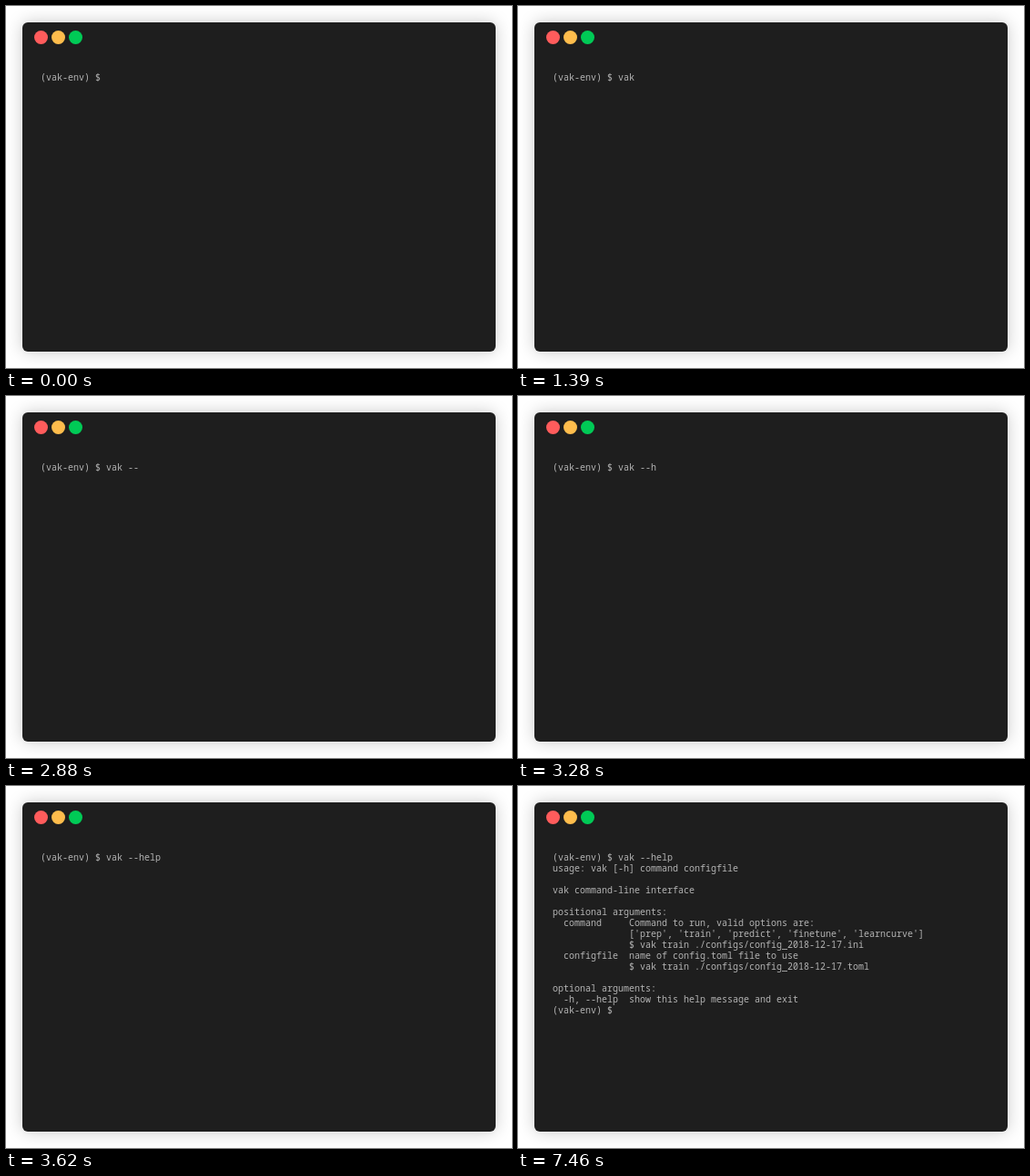
An HTML page for the animation above (7560 ms loop, 556 by 398 pixels).

```html
<!DOCTYPE html>
<html lang="en">
<head>
<meta charset="utf-8">
<title>vak --help</title>
<style>
  html, body {
    margin: 0;
    width: 100%;
    height: 100%;
    overflow: hidden;
    background: #fff;
  }
  .window {
    position: absolute;
    left: 18px;
    top: 18px;
    width: 520px;
    height: 362px;
    border-radius: 6px;
    background: #1e1e1e;
    box-shadow: 0 0 18px rgba(0, 0, 0, .22);
  }
  .dot {
    position: absolute;
    top: 9px;
    width: 15px;
    height: 15px;
    border-radius: 50%;
  }
  .red { left: 13px; background: #ff5c5c; }
  .yellow { left: 32px; background: #ffbd4c; }
  .green { left: 51px; background: #00ca56; }
  pre {
    position: absolute;
    left: 20px;
    top: 54px;
    margin: 0;
    font: 10px/12px "Noto Sans Mono", "Liberation Mono", monospace;
    font-variant-ligatures: none;
    color: #b4b4b4;
  }
  .typed {
    left: 92px;
    overflow: hidden;
    animation: type 7560ms step-end infinite;
  }
  .output { top: 66px; animation: print 7560ms step-end infinite; }
  .again { top: 222px; animation: prompt 7560ms step-end infinite; }

  @keyframes type {
    0% { width: 0; }
    15.872% { width: 6px; }
    17.195% { width: 12px; }
    18.386% { width: 18px; }
    36.111% { width: 30px; }
    38.095% { width: 36px; }
    43.386% { width: 42px; }
    44.973% { width: 48px; }
    46.031% { width: 54px; }
    47.883%, 100% { width: 60px; }
  }
  @keyframes print {
    0% { visibility: hidden; }
    72.222%, 100% { visibility: visible; }
  }
  @keyframes prompt {
    0% { visibility: hidden; }
    98.677%, 100% { visibility: visible; }
  }
</style>
</head>
<body>
<div class="window">
  <i class="dot red"></i><i class="dot yellow"></i><i class="dot green"></i>
  <pre>(vak-env) $</pre>
  <pre class="typed">vak --help</pre>
  <pre class="output">usage: vak [-h] command configfile

vak command-line interface

positional arguments:
  command     Command to run, valid options are:
              ['prep', 'train', 'predict', 'finetune', 'learncurve']
              $ vak train ./configs/config_2018-12-17.ini
  configfile  name of config.toml file to use
              $ vak train ./configs/config_2018-12-17.toml

optional arguments:
  -h, --help  show this help message and exit</pre>
  <pre class="again">(vak-env) $</pre>
</div>
</body>
</html>
```
